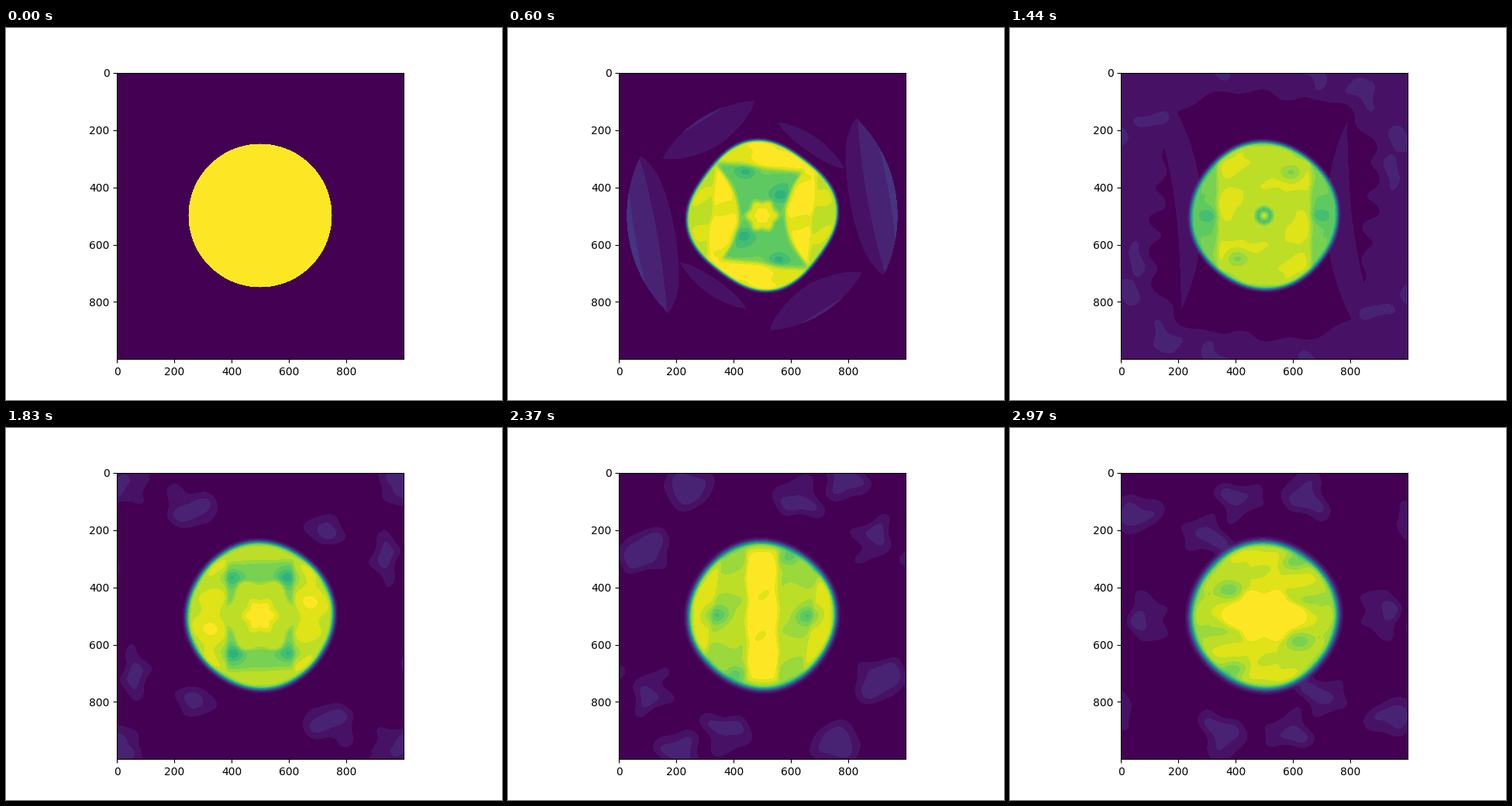
Recreate the animation shown at these times as a matplotlib script. Size 640 by 480 pixels, loop 3 s.

```python
import matplotlib.pyplot as plt
import numpy as np
from matplotlib.animation import FuncAnimation

N, HALF, RADIUS = 370, 185.0, 92.5
FRAMES, STEP = 100, 30

axis = (np.arange(N) + 0.5) / N * 2 * HALF - HALF
X, Y = np.meshgrid(axis, axis)
R, THETA = np.hypot(X, Y), np.arctan2(Y, X)

# Random plane waves: cosines ripple the disc, sines ruffle the patch outlines.
rng = np.random.default_rng(4)
turn, length = rng.uniform(0, np.pi, 6), rng.uniform(35, 75, 6)
PHASES = [2 * np.pi / s * (X * np.cos(a) + Y * np.sin(a))
          for a, s in zip(turn, length)]
RIPPLES = [np.cos(p) for p in PHASES]
WX = X + 4 * sum(np.sin(p) for p in PHASES[:3])
WY = Y + 4 * sum(np.sin(p) for p in PHASES[3:])

# Key moments and the state of the disc at each of them.
TIMES = [0, 600, 1050, 1440, 1830, 2370, 2970]
KEYS = dict(
    front=[92, 30, 17, 60, 43, 20, 20],
    wall=[92, 65, 62, 64, 60, 64, 70],
    slant=[0, .11, 0, 0, 0, .15, .05],
    cap=[92, 62, 78, 72, 70, 84, 78],
    core=[92, 19, 17, 36, 45, 10, 32],
    aspect=[1, 1, 1, 1, 1, 1, 1.6],
    middle=[1, .76, .96, .93, .80, 1, .95],
    column=[1, 1, .84, .82, .93, .88, .91],
    side=[1, .91, .88, .80, .93, .94, .90],
    top=[1, 1, .90, .88, .92, .90, .90],
    center=[1, .95, 1, .89, .91, 1, 1],
)
SPOTS = [
    ([-20, -20, 50, -73, 35, 35, 40], [-57, -57, -60, 0, -50, -75, -70]),
    ([25, 25, -40, 35, -38, -58, -45], [-25, -25, -40, -55, -50, 0, -33]),
]

# Arms thrown off by the rim: birth, angle, half span, speed, level.
ARMS = [
    (0, -10, 36, .137, .14),
    (0, -122, 28, .093, .08),
    (150, -55, 25, .066, .07),
    (780, -145, 30, .130, .09),
]
TILES = [(0, 0), (1, 0), (-1, 0), (0, 1), (0, -1)]

# Paths of the patches that wander around the disc later on.
PATHS = [
    ([-140, -90, -95, -35], [-125, -138, -165, -152]),
    ([125, 178, 108, 55], [-160, -172, -172, -150]),
    ([165, 162, 145, 155], [-60, -75, -103, -8]),
    ([-190, -180, -155, -165], [-100, -165, -82, -130]),
    ([60, 88, 45, -70], [-180, -108, -148, -100]),
]


def step(d, width):
    return 0.5 + 0.5 * np.tanh(d / width)


def pulse(t, when, width):
    return np.exp(-((t - when) / width)**2)


def arm(t, born, angle, span, speed, level):
    """Two opposite crescents running outward, re-entering at the edges."""
    field = np.zeros((N, N))
    reach = speed * (t - born)
    if reach <= 0:
        return field
    level *= np.interp(t, [1100, 1600], [1, 0])
    for i, j in TILES:
        x, y = X - 2 * HALF * i, Y - 2 * HALF * j
        off = np.arctan2(y, x) - np.radians(angle)
        off = (off + np.pi / 2) % np.pi - np.pi / 2
        window = np.sqrt(np.clip(1 - (off / np.radians(span))**2, 0, 1))
        depth = min(0.8 * reach, 60) * window + 1e-6
        behind = (RADIUS + reach - np.hypot(x, y)) / depth
        value = level * (0.4 + 0.6 * window) * (1 - 0.75 * behind)
        field = np.maximum(field, np.where((behind > 0) & (behind < 1), value, 0))
    return field


def patch(t, xs, ys, tilt):
    x, y = (np.interp(t, TIMES[3:5] + TIMES[5:], v) for v in (xs, ys))
    dx, dy = ((d + HALF) % (2 * HALF) - HALF for d in (WX - x, WY - y))
    c, s = np.cos(tilt), np.sin(tilt)
    d2 = ((dx * c + dy * s) / 36)**2 + ((dy * c - dx * s) / 27)**2
    value = 0.1 * np.clip(1 - d2, 0, 1)
    return np.maximum(value, value[::-1, ::-1])


def surroundings(t):
    layers = [arm(t, *a) for a in ARMS]
    if t > 1100:
        shown = np.interp(t, [1150, 1440], [0, 1])
        layers += [shown * patch(t, *path, 0.9 * i) for i, path in enumerate(PATHS)]
        frame = (WX / 140)**4 + (WY / 160)**4
        layers.append(0.06 * pulse(t, 1440, 250) * step(frame - 1, 0.3))
    return np.max(layers, axis=0)


def interior(t):
    k = {name: np.interp(t, TIMES, v) for name, v in KEYS.items()}
    grown = min(t / 600, 1)
    width = np.abs(X)
    wall = np.abs(X + k["slant"] * Y)
    cap = np.abs(Y - 0.13 * pulse(t, 600, 250) * X)
    front = k["front"] + 0.007 * pulse(t, 600, 250) * Y**2

    def cover(field, level, mask):
        return field + (level - field) * mask

    v = cover(k["middle"], k["column"], step(width - front, 3))
    v = cover(v, k["side"], step(wall - k["wall"], 2))
    v = cover(v, k["top"], step(cap - k["cap"], 4))
    for xs, ys in SPOTS:
        x, y = (np.interp(t, TIMES, p) for p in (xs, ys))
        for sign in (1, -1):
            d2 = ((X - sign * x) / 15)**2 + ((Y - sign * y) / 11)**2
            v = v - 0.13 * grown * np.exp(-d2)
    v = v + 0.018 * grown * sum(
        w * np.cos(t / 260 + 2 * i) for i, w in enumerate(RIPPLES))

    r = np.hypot(X / k["aspect"], Y)
    star = k["core"] * (1 + 0.1 * np.cos(6 * THETA))
    v = cover(v, k["center"], step(star - r, 3))
    v = v + 0.07 * step(0.45 * star - r, 3)
    v = v - 0.24 * pulse(t, 1440, 150) * np.exp(-((R - 8) / 5)**2)
    return np.clip(v, 0, 1)


def density(t):
    lobes = 1.2 + 2.6 * pulse(t, 600, 300)
    rim = RADIUS + min(t / 600, 1) * (
        1.3 + lobes * np.cos(4 * (THETA + np.radians(8))))
    soft = np.interp(t, [0, 600, 2970], [0.01, 1.8, 4.1])
    disc = step(rim - R, soft)
    out = surroundings(t)
    inn = interior(t) if t else 1
    return np.round((out * (1 - disc) + inn * disc) * 20) / 20


fig, ax = plt.subplots(figsize=(6.4, 4.8), dpi=100)
image = ax.imshow(density(0), cmap="viridis", vmin=0, vmax=1,
                  interpolation="nearest", extent=(-0.5, 999.5, 999.5, -0.5))


def update(frame):
    image.set_data(density(frame * STEP))
    return [image]


anim = FuncAnimation(fig, update, frames=FRAMES, interval=STEP,
                     repeat=True, repeat_delay=0)
plt.show()
```
